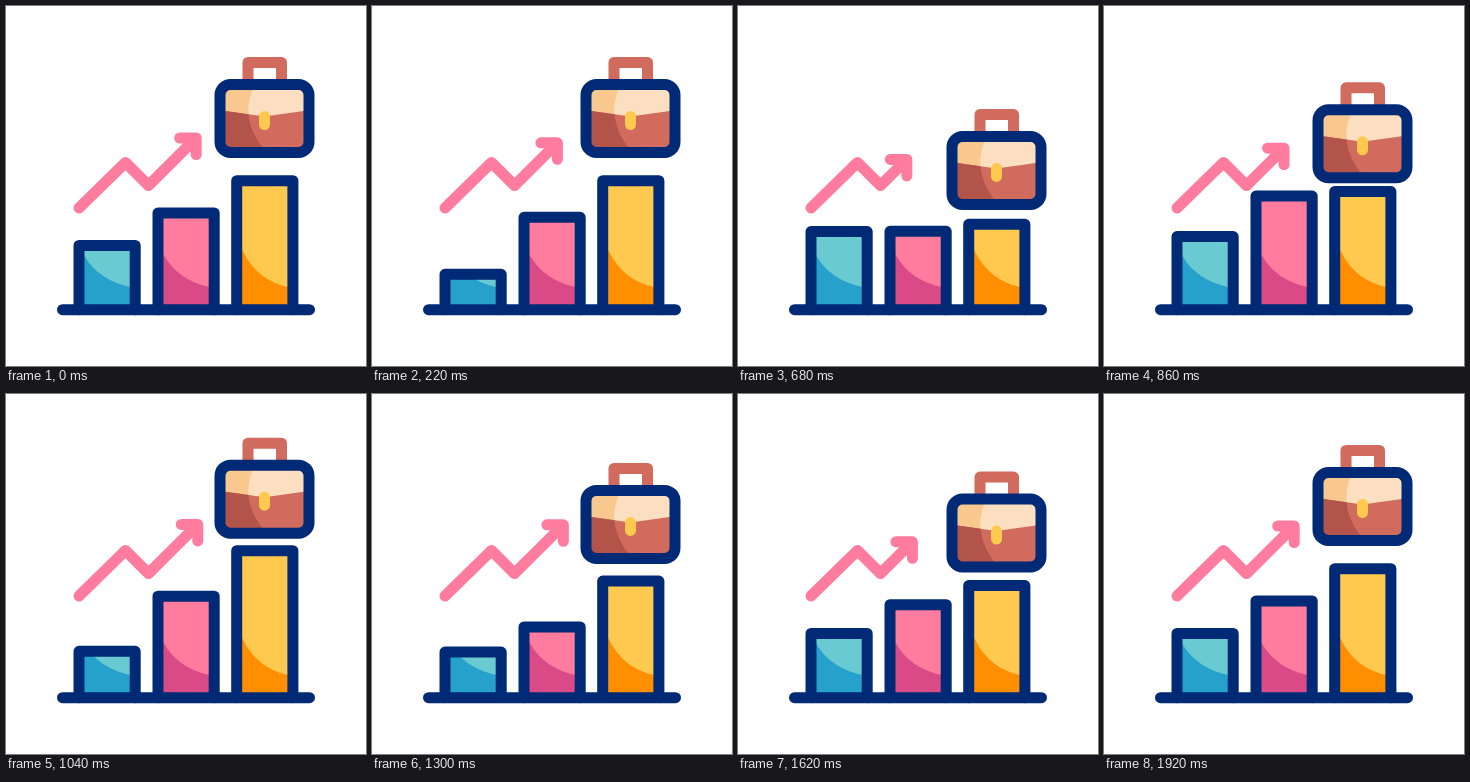
An HTML page for the animation above (2400 ms loop, 360 by 360 pixels).

```html
<!DOCTYPE html>
<html lang="en">
<head>
<meta charset="utf-8">
<title>Career growth</title>
<style>
  html, body { margin: 0; width: 100%; height: 100%; overflow: hidden; background: #fff; }
  svg { display: block; width: 100%; height: 100%; }
  .line { fill: none; stroke-width: 11; stroke-linecap: round; stroke-linejoin: round; }
  .navy { stroke: #002a76; }
  .pink { stroke: #ff7c9f; }
</style>
</head>
<body>
<svg viewBox="0 0 360 360">
  <defs>
    <clipPath id="caseClip"><rect x="214" y="78.5" width="89" height="68" rx="10.5"/></clipPath>
  </defs>
  <path id="arrow" class="line pink"/>
  <g id="bars"></g>
  <path class="line navy" d="M56.5 303.7H303.5"/>
  <g id="case">
    <path class="line" stroke="#d06b5d" d="M242 78V56.5H275.5V78"/>
    <g clip-path="url(#caseClip)">
      <path fill="#fcdfc0" d="M214 78H303V147H214Z"/>
      <path fill="#f9c88e" d="M214 78H249Q240 96 243 112H214Z"/>
      <path fill="#d06b5d" d="M214 104.3L258.5 110.5L303 104.3V147H214Z"/>
      <path fill="#b3544b" d="M214 104.3L242.5 108.3Q244 128 261 147H214Z"/>
    </g>
    <path class="line" stroke="#ffc84e" d="M258.5 110.5V118.5"/>
    <rect class="line navy" x="214" y="78.5" width="89" height="68" rx="10.5"/>
  </g>
</svg>
<script>
const LOOP = 2400;
const BASE = 303.7;
const $ = id => document.getElementById(id);

// Keys are [time, value]; each stretch eases in and out.
function track(keys, t) {
  if (t <= keys[0][0]) return keys[0][1];
  for (let i = 1; i < keys.length; i++) {
    const [t0, a] = keys[i - 1], [t1, b] = keys[i];
    if (t < t1) {
      const p = (t - t0) / (t1 - t0);
      return a + (b - a) * p * p * (3 - 2 * p);
    }
  }
  return keys[keys.length - 1][1];
}

const barBounce = [[0, 0], [365, 44], [740, -18], [1155, 26], [1570, 0]];
const caseBounce = [[300, 0], [685, 52], [1065, -8], [1480, 35], [1920, 0]];
const arrowSlide = [[80, 0], [570, -24], [1170, 5], [1650, -16], [1920, 0]];

const bars = [
  { x: 73, top: 239.5, curve: 251, delay: 0, light: '#69cad1', dark: '#26a1cc' },
  { x: 152, top: 207, curve: 249.5, delay: 150, light: '#ff7c9f', dark: '#da4a87' },
  { x: 230.7, top: 174.7, curve: 245, delay: 300, light: '#ffc94f', dark: '#ff8f00' }
];
const BAR_WIDTH = 56.2;

$('bars').innerHTML = bars.map(({ x, curve, light, dark }, i) => `
  <clipPath id="clip${i}"><rect x="${x}" width="${BAR_WIDTH}"/></clipPath>
  <g clip-path="url(#clip${i})">
    <rect x="${x}" y="120" width="${BAR_WIDTH}" height="190" fill="${dark}"/>
    <path fill="${light}" d="M${x} 120V${curve - 9}L${x + 6} ${curve}
      Q${x + 20} 274 ${x + 51} 281L${x + BAR_WIDTH} 282V120Z"/>
  </g>
  <path id="outline${i}" class="line navy"/>`).join('');

function draw(t) {
  bars.forEach(({ x, top, delay }, i) => {
    const y = top + track(barBounce, t - delay);
    const clip = $('clip' + i).firstElementChild;
    clip.setAttribute('y', y);
    clip.setAttribute('height', BASE - y);
    $('outline' + i).setAttribute('d', `M${x} ${BASE}V${y}h${BAR_WIDTH}V${BASE}`);
  });

  $('case').setAttribute('transform', `translate(0 ${track(caseBounce, t)})`);

  const slide = track(arrowSlide, t);
  const x = 190.2 + slide, y = 132 - slide;
  $('arrow').setAttribute('d',
    `M73 202L119.5 156.5L142.5 179.5L${x} ${y}M${x - 16.5} ${y}H${x}V${y + 16.5}`);
}

const start = performance.now();
function tick() {
  draw((performance.now() - start) % LOOP);
  requestAnimationFrame(tick);
}
draw(0);
requestAnimationFrame(tick);
</script>
</body>
</html>
```
